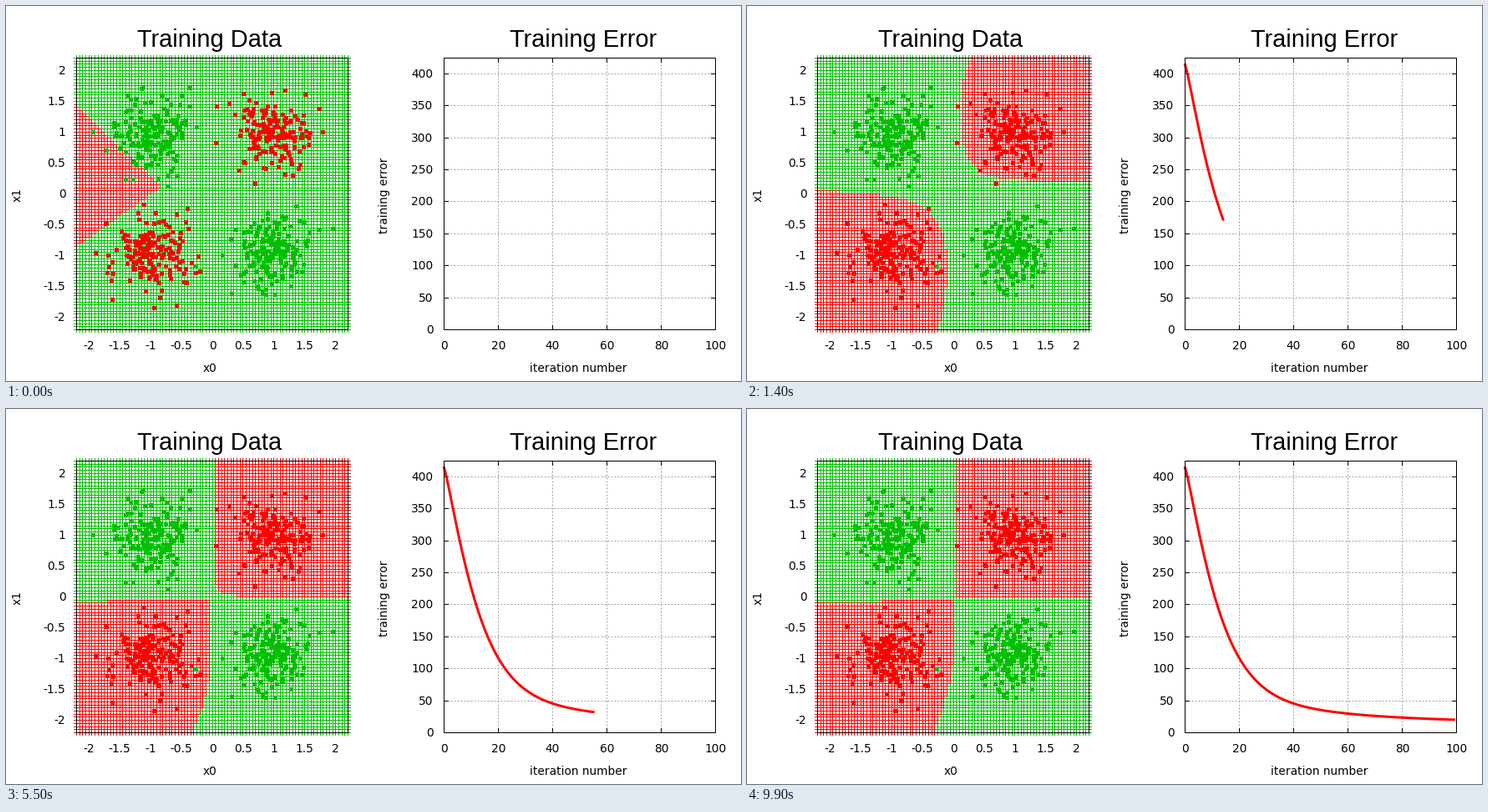
Write a matplotlib script that moves like this. It is 880 by 450 pixels and loops after 10 s.

```python
import numpy as np
import matplotlib.pyplot as plt
from matplotlib.animation import FuncAnimation

W, H = 880, 450
PT = 0.72                      # points per pixel at 100 dpi
RED, GREEN = (1, 0, 0), (0, 192 / 255, 0)
TOP, BOTTOM = 62, 388
LEFT_PLOT, RIGHT_PLOT = (84, 409), (524, 849)
LIMIT, EMAX = 2.2, 424.5       # axis ranges of the two plots
N, ARM, DOT = 89, 3, 2         # lattice size, plus arm, half size of a sample


def scale(v, lo, hi, a, b):
    return a + (b - a) * (v - lo) / (hi - lo)


def to_x(v):
    return scale(v, -LIMIT, LIMIT, *LEFT_PLOT)


def to_y(v):
    return scale(v, -LIMIT, LIMIT, BOTTOM, TOP)


# lattice nodes on whole pixels; halves round towards the upper right
COLS = np.floor(np.linspace(*LEFT_PLOT, N) + 0.5).astype(int)
ROWS = np.ceil(np.linspace(TOP, BOTTOM, N) - 0.5).astype(int)
GX, GY = (g.ravel() for g in np.meshgrid(COLS, ROWS))
X0, Y0 = LEFT_PLOT[0] - ARM, TOP - ARM
SHAPE = (BOTTOM + ARM + 1 - Y0, LEFT_PLOT[1] + ARM + 1 - X0, 3)

# four clusters in an XOR layout
rng = np.random.default_rng(4)
SAMPLES = []
for sx, sy in [(1, 1), (-1, -1), (-1, 1), (1, -1)]:
    px, py = rng.normal((0.95 * sx, 0.95 * sy), 0.3, (180, 2)).T
    SAMPLES.append((RED if sx == sy else GREEN,
                    np.rint(to_x(px)).astype(int), np.rint(to_y(py)).astype(int)))


def soft_inside(s, *dist):
    """True where all edge distances are positive, corners rounded by s."""
    return sum(np.exp(np.clip(-d / s, -50, 50)) for d in dist) < 1


def lower_left(x, y, it):
    start = np.exp(-it / 1.5)
    tilt = 8 - 230 / (it + 1.4)
    top = 226 + 45 * start + tilt * (247 - x) / 166
    bulge = max(0, 26 - 160 / (1 + it)) * np.clip((y - 300) / 92, 0, 1) ** 1.5
    slant = 1.4 * start * np.clip(y - 213, 0, None)
    right = 248 - 56 / (1 + it) - bulge - slant
    s = 1 + 40 * (1 - np.exp(-it)) * np.exp(-(it / 30) ** 2)
    return soft_inside(s, y - top, right - x)


def upper_right(x, y, it):
    bottom = 226 - 60 * np.exp(-it / 10)
    left = 247 + 55 * np.exp(-it / 6) + 200 * np.exp(-it)
    top = 125 - 6.8 * it + 0.0029 * (x - 325) ** 2
    s = 1 + 30 * (1 - np.exp(-it / 6)) * np.exp(-(it / 50) ** 2)
    return soft_inside(s, bottom - y, x - left, y - top)


def error(it):
    return 335 * np.exp(-(it / 13) ** 1.2) + 64 * np.exp(-it / 40) + 15


def lattice(it):
    """Plus signs coloured by predicted class, with the samples on top."""
    red = lower_left(GX, GY, it) | upper_right(GX, GY, it)
    img = np.ones(SHAPE)
    for mask, color in ((red, RED), (~red, GREEN)):
        x, y = GX[mask] - X0, GY[mask] - Y0
        for d in range(-ARM, ARM + 1):
            img[y, x + d] = color
            img[y + d, x] = color
    for color, x, y in SAMPLES:
        for dx in range(-DOT, DOT + 1):
            for dy in range(-DOT, DOT + 1):
                img[y - Y0 + dy, x - X0 + dx] = color
    return img


fig = plt.figure(figsize=(W / 100, H / 100), dpi=100, facecolor="white")
ax = fig.add_axes([0, 0, 1, 1])
ax.axis("off")


def line(x, y, **kw):
    """Line through pixel centres."""
    style = dict(color="black", lw=PT, solid_capstyle="projecting", snap=False, zorder=2)
    style.update(kw)
    return ax.plot(np.asarray(x) + 0.5, np.asarray(y) + 0.5, **style)[0]


def text(x, y, s, ha="center", size=13.7, font="DejaVu Sans", **kw):
    ax.text(x, y, s, ha=ha, va="baseline", fontsize=size * PT, family=font, **kw)


def side_label(x, s):
    text(x, 227, s, rotation=90, rotation_mode="anchor")


def frame(span, xticks, yticks):
    """Border and tick labels."""
    a, b = span
    line([a, b, b, a, a], [TOP, TOP, BOTTOM, BOTTOM, TOP], zorder=6)
    for x, s in xticks:
        text(x + 0.5, 412, s)
    for y, s in yticks:
        text(a - 12.5, y + 5, s, ha="right")


def grid(span, xticks, yticks, tick=5):
    """Dashed grid with inward ticks on all sides."""
    a, b = span
    dash = dict(color="#a0a0a0", dashes=(2, 2), dash_capstyle="butt", zorder=1)
    for x, _ in xticks[1:-1]:
        x = round(x)
        line([x, x], [BOTTOM, TOP], **dash)
        line([x, x], [BOTTOM, BOTTOM - tick])
        line([x, x], [TOP, TOP + tick])
    for y, _ in yticks[1:]:
        y = round(y)
        line([a, b], [y, y], **dash)
        line([a, a + tick], [y, y])
        line([b, b - tick], [y, y])


# left plot
grid_img = ax.imshow(lattice(0), extent=(X0, X0 + SHAPE[1], Y0 + SHAPE[0], Y0),
                     interpolation="nearest", aspect="auto", zorder=1)
ticks = np.arange(-2, 2.5, 0.5)
frame(LEFT_PLOT, [(to_x(v), f"{v:g}") for v in ticks], [(to_y(v), f"{v:g}") for v in ticks])
text(243.5, 49, "Training Data", size=29, font="Liberation Sans")
text(244, 439, "x0")
side_label(17.5, "x1")

# right plot
xticks = [(scale(v, 0, 100, *RIGHT_PLOT), str(v)) for v in range(0, 101, 20)]
yticks = [(scale(v, 0, EMAX, BOTTOM, TOP), str(v)) for v in range(0, 401, 50)]
grid(RIGHT_PLOT, xticks, yticks)
frame(RIGHT_PLOT, xticks, yticks)
text(691.5, 49, "Training Error", size=29, font="Liberation Sans")
text(685, 439, "iteration number")
side_label(456.5, "training error")

STEPS = np.arange(100)
CX = scale(STEPS, 0, 100, *RIGHT_PLOT)
CY = scale(error(STEPS), 0, EMAX, BOTTOM, TOP)
curve = line([], [], color=RED, lw=3 * PT, solid_joinstyle="round", zorder=4)
line([CX[0] - 0.5, CX[0] + 0.5], [CY[0]] * 2, lw=3 * PT, solid_capstyle="butt", zorder=7)

ax.set_xlim(0, W)
ax.set_ylim(H, 0)


def update(i):
    grid_img.set_data(lattice(i))
    shown = i + 1 if i else 0
    curve.set_data(CX[:shown] + 0.5, CY[:shown] + 0.5)
    return grid_img, curve


anim = FuncAnimation(fig, update, frames=100, interval=100, repeat=True, repeat_delay=0)
plt.show()
```
